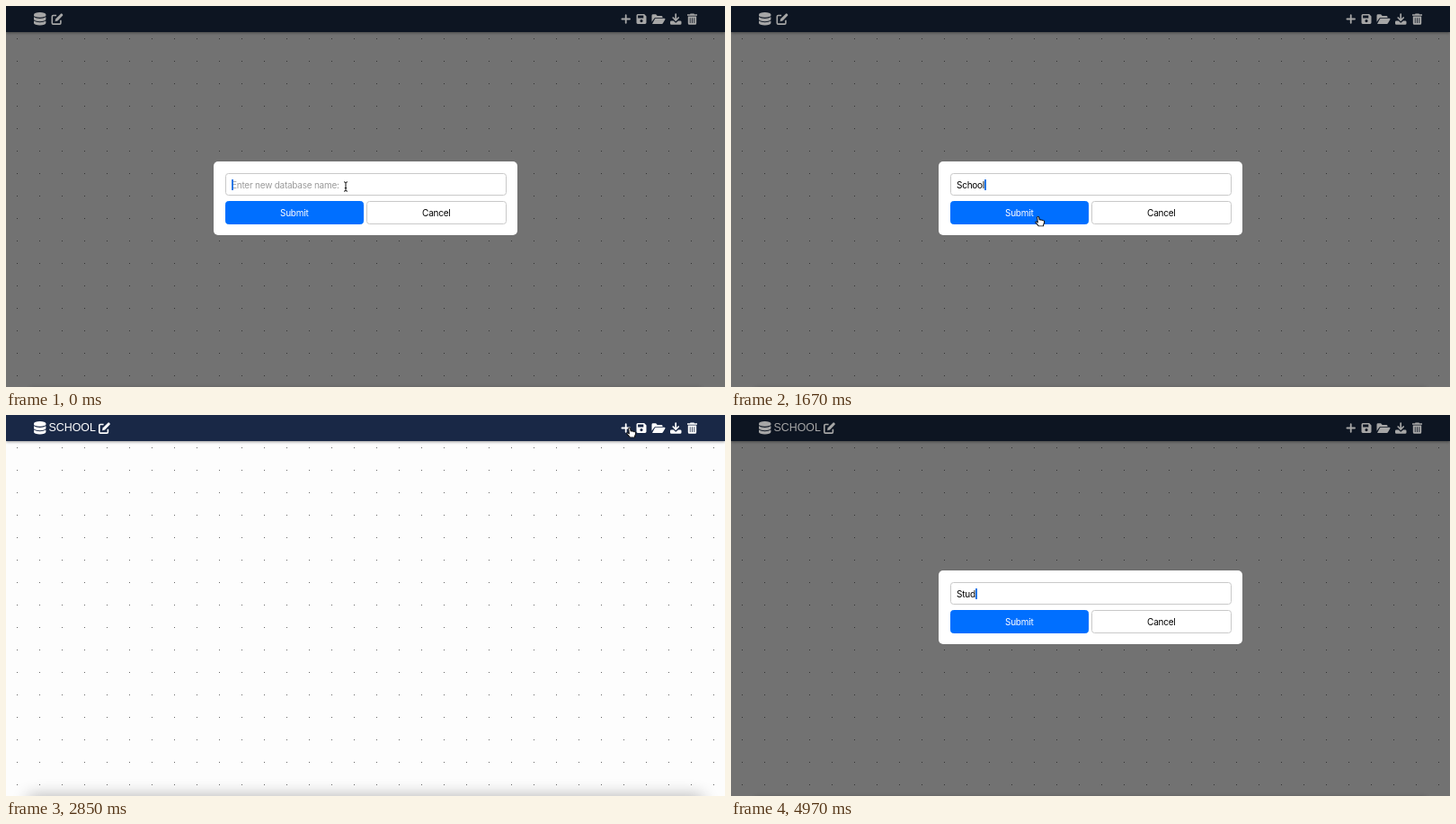
Write an HTML page that moves like this. It is 800 px wide and 424 px high and loops after 5 s.

```html
<!DOCTYPE html>
<html lang="en">
<head>
<meta charset="utf-8">
<title>Database designer</title>
<style>
  html, body { margin: 0; width: 100%; height: 100%; overflow: hidden; }
  #stage {
    --ink: #fff; --bar: #192846; --page: #fdfdfd; --dot: #686868;
    position: relative; width: 800px; height: 424px; overflow: hidden;
    background: var(--page); font: 10px Inter, sans-serif; letter-spacing: -.24px;
  }
  #stage.dim { --ink: #a6a6a6; --bar: #0d1522; --page: #727272; --dot: #343434; }
  #stage div, #stage svg { position: absolute; box-sizing: border-box; }
  #grid {
    inset: 30px 0 0;
    background: radial-gradient(circle at 12.5px 12.5px, var(--dot) .7px, transparent 1px) 0 -6px / 25px 25px;
  }
  #edge { left: 28px; right: 28px; top: 427px; height: 10px; box-shadow: 0 0 18px 3px rgba(0, 0, 0, .32); }
  .dim #edge { box-shadow: 0 0 5px 1px rgba(0, 0, 0, .4); }
  #bar { left: 0; top: 0; width: 800px; height: 29px; background: var(--bar); box-shadow: 0 1px 3px rgba(0, 0, 0, .4); }
  #title { left: 47.5px; top: 4px; line-height: 20px; font: 12.4px/20px "Liberation Sans", sans-serif; letter-spacing: 0; color: var(--ink); }
  svg { left: 0; top: 0; width: 800px; height: 424px; }
  #icons { fill: var(--ink); fill-rule: evenodd; }
  #icons .line { fill: none; stroke: var(--ink); }
  #modal { left: 231px; top: 173px; width: 338px; height: 81.5px; border-radius: 5px; background: #fff; }
  .box { height: 25.5px; line-height: 24px; border: 1px solid #c9c9c9; border-radius: 3.5px; text-align: center; color: #000; }
  #field { left: 12.5px; top: 12.5px; width: 313px; padding-left: 6.5px; text-align: left; white-space: pre; }
  #field.empty { color: #9b9b9b; }
  #submit { left: 12.5px; top: 44px; width: 154.5px; border-color: #006fff; background: #006fff; color: #fff; }
  #cancel { left: 170px; top: 44px; width: 155.5px; }
  #caret { top: 6.5px; width: 1.5px; height: 11.5px; background: #2277e6; }
  #pointer path { stroke-linejoin: round; }
</style>
</head>
<body>
<div id="stage">
  <div id="grid"></div>
  <div id="edge"></div>
  <div id="bar"></div>
  <div id="title">SCHOOL</div>
  <svg id="icons">
    <g transform="translate(31 7)">
      <path d="M0 2.6A6.7 2.6 0 0 1 13.4 2.6V3.4A6.7 2.4 0 0 1 0 3.4Z"/>
      <path id="disk" d="M0 5.2Q2.5 6.9 6.7 6.9T13.4 5.2V7.8A6.7 2.4 0 0 1 0 7.8Z"/>
      <use href="#disk" y="4.3"/>
    </g>
    <g id="edit">
      <path class="line" stroke-width="1.6" d="M5.6 2.2H2A1.2 1.2 0 0 0 .8 3.4V10.6A1.2 1.2 0 0 0 2 11.8H9.2A1.2 1.2 0 0 0 10.4 10.6V7.4"/>
      <path d="M10.4 .4A1.2 1.2 0 0 1 12 .4L12.5 .9A1.2 1.2 0 0 1 12.5 2.5L7 8.1L4 8.9L4.8 5.9Z"/>
    </g>
    <path class="line" stroke-width="1.8" stroke-linecap="round" d="M685.4 14.5H694M689.7 10.2V18.8"/>
    <path transform="translate(701.5 9)" d="M1.5 0H8.6L11 2.4V9.6A1.4 1.4 0 0 1 9.6 11H1.4A1.4 1.4 0 0 1 0 9.6V1.5A1.5 1.5 0 0 1 1.5 0ZM1.6 1.6V4.4H7.8V1.6ZM5.5 6A1.6 1.6 0 1 0 5.5 9.2A1.6 1.6 0 1 0 5.5 6Z"/>
    <path transform="translate(718.5 9.3)" d="M0 8.5V1.4A1.4 1.4 0 0 1 1.4 0H4.6L6.2 1.6H10.6A1.4 1.4 0 0 1 12 3V3.6H4.6A2.3 2.3 0 0 0 2.6 4.7ZM.7 10.3L3.4 5.3A1.4 1.4 0 0 1 4.6 4.5H14.2A.8 .8 0 0 1 14.9 5.7L12.4 10A1.4 1.4 0 0 1 11.2 10.7H1A.3 .3 0 0 1 .7 10.3Z"/>
    <g transform="translate(739 8)">
      <path class="line" stroke-width="1.7" stroke-linecap="round" d="M6.2 1V7.8M3.2 5L6.2 8L9.2 5"/>
      <path d="M1.3 8.4H3.8L5.3 9.9A1.4 1.4 0 0 0 7.3 9.9L8.8 8.4H11.2A1.3 1.3 0 0 1 12.5 9.7V11.4A1.3 1.3 0 0 1 11.2 12.7H1.3A1.3 1.3 0 0 1 0 11.4V9.7A1.3 1.3 0 0 1 1.3 8.4Z"/>
    </g>
    <path transform="translate(758 8)" d="M3.5 .4H7.5L8 1.2H11V2.8H0V1.2H3ZM.8 3.6H10.2V11.2A1.5 1.5 0 0 1 8.7 12.7H2.3A1.5 1.5 0 0 1 .8 11.2ZM2.8 5.2V11H3.6V5.2ZM5.1 5.2V11H5.9V5.2ZM7.4 5.2V11H8.2V5.2Z"/>
  </svg>
  <div id="modal">
    <div id="field" class="box"><span id="value"></span><div id="caret"></div></div>
    <div id="submit" class="box">Submit</div>
    <div id="cancel" class="box">Cancel</div>
  </div>
  <svg id="pointer"><g id="mouse">
    <path id="beam" fill="none" stroke="#111" d="M-2-5.2Q0-5.2 0-4V4Q0 5.2-2 5.2M2-5.2Q0-5.2 0-4M0 4Q0 5.2 2 5.2M-1.2 1.6H1.2"/>
    <path id="arrow" fill="#000" stroke="#fff" stroke-width=".8" d="M0 0V9L2 7.1L3.4 10.3L4.8 9.7L3.4 6.6H6.2Z"/>
    <path id="hand" transform="translate(.2 0) scale(1.18 1.04)" fill="#fff" stroke="#111" stroke-width=".9" d="M-.9 .6C-.9-.4 .7-.4 .8 .6L1.2 3.4C1.6 2.9 2.6 3 2.8 3.7C3.3 3.2 4.2 3.4 4.4 4.1C5 3.8 5.8 4.2 5.9 5C6 7 5.6 7.6 5 8.6V10H.4C0 8.8-1.4 7.6-2.3 6.2C-2.7 5.3-1.6 4.9-.9 5.7L-.3 6.2Z"/>
  </g></svg>
</div>
<script>
  const LOOP = 5000, CLOSE = 1690, OPEN = 2870, FOCUS = 4080;
  const $ = id => document.getElementById(id);

  // [time, letters typed so far]
  const first = [[0, 0], [300, 1], [420, 2], [530, 3], [640, 4], [760, 5], [970, 6]];
  const second = [[0, 0], [4480, 1], [4640, 2], [4760, 3], [4880, 4]];
  const shapes = [[0, 'beam'], [300, ''], [1240, 'beam'], [1320, 'arrow'], [1350, 'hand'],
    [2060, 'arrow'], [2640, 'hand'], [2980, 'arrow'], [3560, 'beam'], [4480, '']];
  // [time, x, y] of the pointer's hot spot
  const path = [[0, 378, 201], [220, 372.5, 202.5], [1250, 372.5, 202.5], [1540, 341.5, 234.5],
    [2050, 341.5, 234.5], [2800, 693.5, 14.5], [2950, 693.5, 14.5], [3820, 352, 197], [LOOP, 352, 197]];

  const stepAt = (steps, t) => steps.findLast(s => s[0] <= t)[1];

  // a hand movement: quick start, slow arrival
  function ease(k) {
    const u = 1 - (1 - k) ** 1.5;
    return u * u * (3 - 2 * u);
  }

  function pointAt(t) {
    const i = path.findIndex(p => p[0] > t);
    const [t0, x0, y0] = path[i - 1], [t1, x1, y1] = path[i];
    const k = ease((t - t0) / (t1 - t0));
    return [x0 + (x1 - x0) * k, y0 + (y1 - y0) * k];
  }

  function draw(t) {
    const named = t >= CLOSE;
    const open = !named || t >= OPEN;
    $('stage').classList.toggle('dim', open);
    $('modal').style.visibility = open ? 'visible' : 'hidden';
    $('title').style.visibility = named ? 'visible' : 'hidden';
    $('edit').setAttribute('transform', `translate(${named ? 103 : 50.5} 8.3)`);

    const text = named ? 'Student'.slice(0, stepAt(second, t)) : 'School'.slice(0, stepAt(first, t));
    const hint = named ? 'Enter table name:' : 'Enter new database name:';
    $('value').textContent = text || hint;
    $('field').classList.toggle('empty', !text);
    $('caret').style.left = 6.5 + (text ? $('value').offsetWidth : 0) + 'px';
    $('caret').style.display = !named || t >= FOCUS ? 'block' : 'none';

    const shape = stepAt(shapes, t);
    for (const id of ['beam', 'arrow', 'hand']) $(id).style.display = id === shape ? 'inline' : 'none';
    $('mouse').setAttribute('transform', `translate(${pointAt(t)})`);
  }

  function tick() {
    draw(performance.now() % LOOP);
    requestAnimationFrame(tick);
  }
  tick();
</script>
</body>
</html>
```
